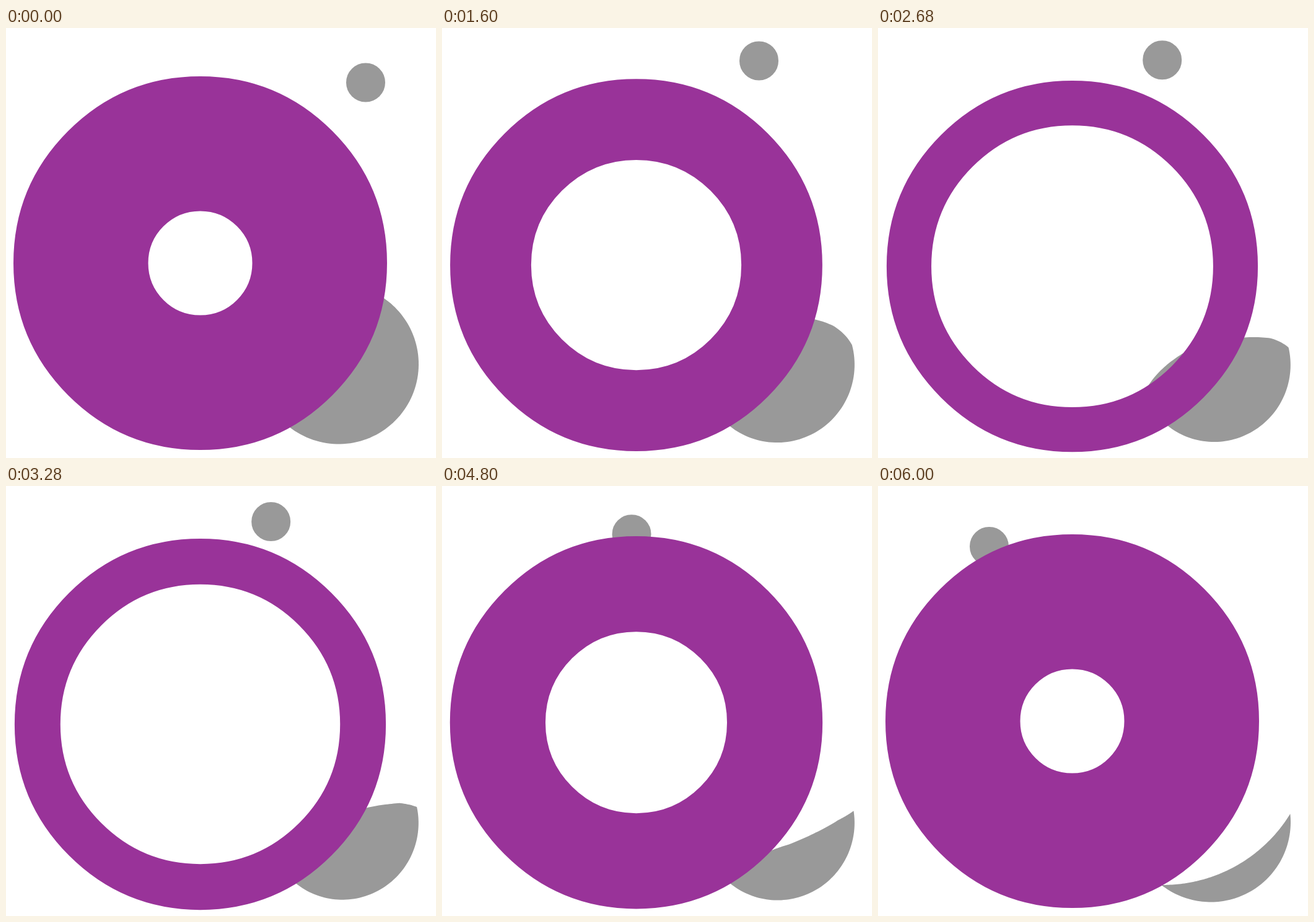
Recreate the animation shown at these times as an HTML page with a canvas. Size 694x694 px, loop 6040 ms.

```html
<!DOCTYPE html>
<html>
<head>
<meta charset="utf-8">
<title>Ring and morphing shapes</title>
<style>
html, body { margin: 0; width: 100%; height: 100%; overflow: hidden; background: #fff; }
canvas { display: block; }
</style>
</head>
<body>
<canvas id="stage" width="694" height="694"></canvas>
<script>
const ctx = document.getElementById('stage').getContext('2d');
const LOOP = 6040, STEP = 40, END = 6000, PEAK = 2960;
const GREY = '#999', PURPLE = '#939';

// Keyframes: [time, ...values]
const ringKeys = [[0, 379.5, 301.5, 84], [PEAK, 385.1, 299.4, 242.4], [END, 379.5, 301.5, 84]];
const dotKeys = [[0, 580.5, 88], [1960, 496, 45], [4000, 390.4, 64.4], [END, 179.5, 97.6]];

// Angles in degrees: position on the full disc -> position on the crescent's inner edge
const innerEdge = [[-180, 90.6], [-135, 75.6], [-90, 64.2], [-67.5, 52.1], [-45, 41.3], [-16.7, 31.5]];
const outerEdge = [[-16.7, -6], [180, 128]];
const disc = [537, 542.5, 129];
const bite = [460, 402.9, 241];

const lerp = (a, b, k) => a + (b - a) * k;

function sample(keys, t) {
  let i = 1;
  while (i < keys.length - 1 && t > keys[i][0]) i++;
  const a = keys[i - 1], b = keys[i], k = (t - a[0]) / (b[0] - a[0]);
  return a.slice(1).map((v, j) => lerp(v, b[j + 1], k));
}

function polar([x, y, r], deg) {
  const a = deg * Math.PI / 180;
  return [x + r * Math.cos(a), y + r * Math.sin(a)];
}

// Circle built from eight quadratic curves
function addCircle(x, y, r) {
  const outer = r / Math.cos(Math.PI / 8);
  ctx.moveTo(x + r, y);
  for (let a = 45; a <= 360; a += 45) {
    ctx.quadraticCurveTo(...polar([x, y, outer], a - 22.5), ...polar([x, y, r], a));
  }
  ctx.closePath();
}

function addEdge(edge, target, u) {
  const from = edge[0][0], to = edge[edge.length - 1][0], n = 80;
  for (let i = 0; i <= n; i++) {
    const deg = lerp(from, to, i / n);
    const a = polar(disc, deg), b = polar(target, sample(edge, deg)[0]);
    ctx.lineTo(lerp(a[0], b[0], u), lerp(a[1], b[1], u));
  }
}

function fill(color, build) {
  ctx.beginPath();
  build();
  ctx.fillStyle = color;
  ctx.fill('evenodd');
}

function draw(t) {
  const u = t / END;
  const [y, outer, inner] = sample(ringKeys, t);
  ctx.clearRect(0, 0, 694, 694);
  fill(GREY, () => {
    addEdge(innerEdge, bite, u);
    addEdge(outerEdge, disc, u);
  });
  fill(GREY, () => addCircle(...sample(dotKeys, t), 31.5));
  fill(PURPLE, () => {
    addCircle(313.5, y, outer);
    addCircle(313.5, y, inner);
  });
}

const start = performance.now();
function tick() {
  const t = (performance.now() - start) % LOOP;
  draw(Math.floor(t / STEP) * STEP);
  requestAnimationFrame(tick);
}
tick();
</script>
</body>
</html>
```
